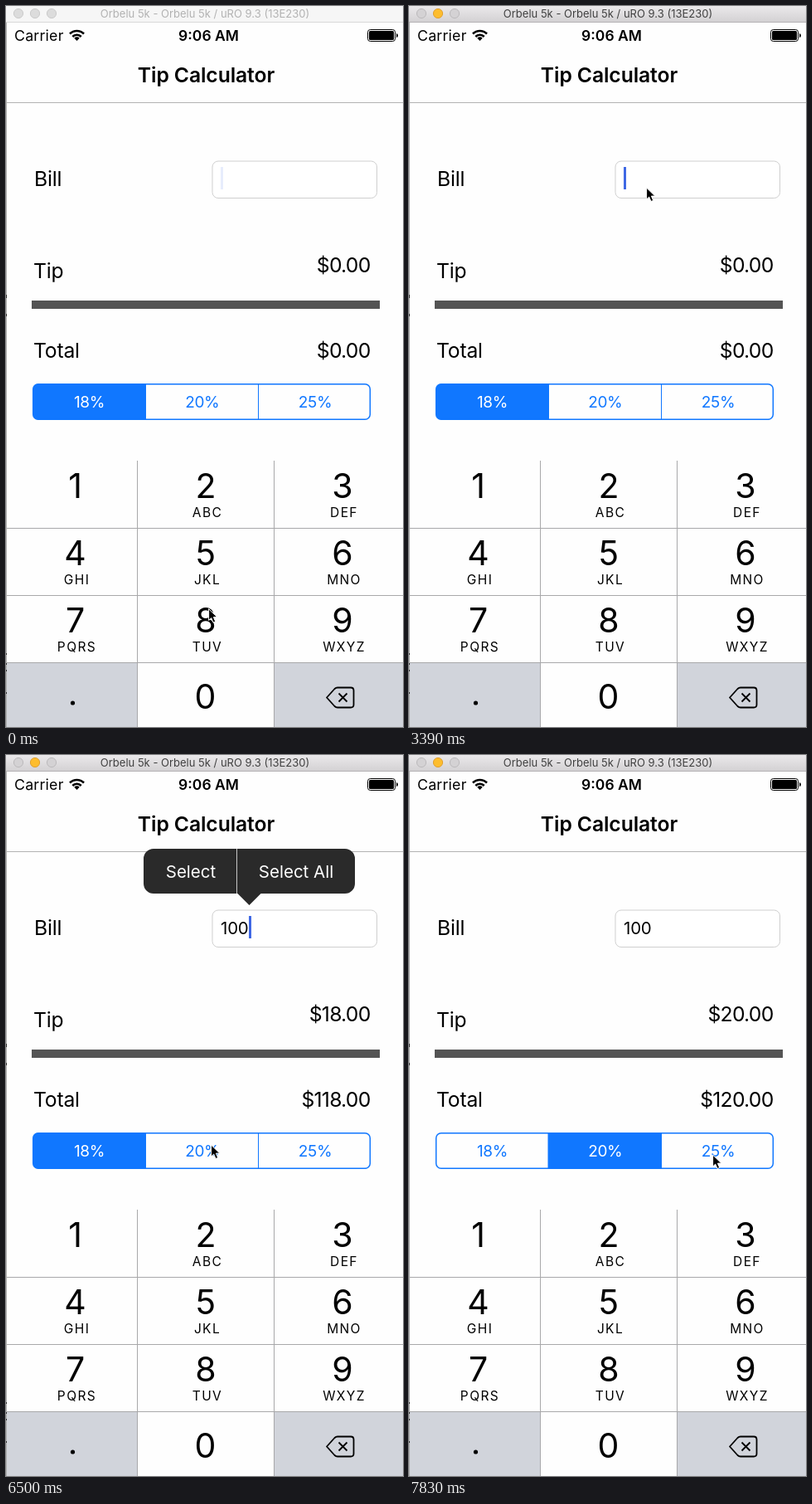
Recreate the animation shown at these times as an HTML page. Size 479x869 px, loop 8000 ms.

```html
<!DOCTYPE html>
<html lang="en">
<head>
<meta charset="utf-8">
<title>Tip Calculator</title>
<style>
html, body { margin: 0; width: 100%; height: 100%; overflow: hidden; background: #fefefe; }
svg { display: block; width: 100%; height: 100%; }
text { font-family: Inter, Roboto, sans-serif; fill: #000; white-space: pre; }
.mid { text-anchor: middle; }
.end { text-anchor: end; }
.label { font-size: 24.7px; letter-spacing: -.2px; }
.money { font-size: 24.7px; letter-spacing: -.75px; }
.seg { font-size: 19px; letter-spacing: -.3px; }
.menu { font-size: 20.5px; fill: #fff; }
.digit { font-size: 41px; }
.abc { font-size: 15.5px; letter-spacing: 1.4px; }
</style>
</head>
<body>
<svg id="stage" viewBox="0 0 479 869" preserveAspectRatio="none">
  <defs>
    <linearGradient id="chrome" x2="0" y2="1">
      <stop stop-color="#ebe9eb"/><stop offset="1" stop-color="#d2d0d2"/>
    </linearGradient>
  </defs>
  <rect width="479" height="869" fill="#fefefe"/>
  <rect id="bar" width="479" height="20"/>
  <path id="barEdge" d="M0 19.5H479"/>
  <g id="lights"></g>
  <text id="title" class="mid" x="240" y="14" font-size="13"></text>

  <path d="M.5 20V869" stroke="#b0b0b0"/>
  <path d="M.5 348v4M.5 371v3M.5 780v2M.5 792v2M.5 800v2M.5 827v2" stroke="#333"/>
  <text x="10" y="42" font-size="17.8" letter-spacing=".2">Carrier</text>
  <g fill="none" stroke="#000" stroke-width="2.6">
    <path d="M77 33.5a12 12 0 0 1 17 0M80.3 37a7.2 7.2 0 0 1 10.4 0"/>
    <path d="M85.5 42l-3.2-3.3a4.5 4.5 0 0 1 6.4 0z" fill="#000" stroke="none"/>
  </g>
  <text class="mid" x="244.500" y="42" font-size="17.500" font-weight="600">9:06 AM</text>
  <rect x="436.500" y="28.500" width="33" height="14" rx="3" fill="none" stroke="#000"/>
  <rect x="438" y="30" width="30" height="11" rx="1.500"/>
  <path d="M471 33q2 .5 2 2.500t-2 2.500z"/>
  <text class="mid" x="241.500" y="91.500" font-size="24.700" font-weight="600" letter-spacing="-.1">Tip Calculator</text>
  <path d="M1 116.500H479" stroke="#b2b2b2"/>

  <text class="label" x="34" y="217">Bill</text>
  <text class="label" x="33" y="328">Tip</text>
  <text class="label" x="33" y="424">Total</text>
  <rect x="249" y="187" width="198.500" height="44.500" rx="7" fill="#fff" stroke="#cfcfcf"/>
  <text id="bill" x="259" y="216" font-size="20.500" letter-spacing="-.2"></text>
  <rect id="caret" y="194" width="3" height="27" fill="#3f68e4"/>
  <text id="tip" class="money end" x="439.500" y="321"></text>
  <rect x="31" y="355" width="420" height="10" fill="#545454"/>
  <text id="total" class="money end" x="439.500" y="424"></text>

  <g id="segments"></g>
  <g id="keys"></g>
  <g id="menu">
    <path d="M178 113H409a12 12 0 0 1 12 12V155a12 12 0 0 1-12 12H307.500L293.500 181 279.500 167H178a12 12 0 0 1-12-12V125a12 12 0 0 1 12-12z" fill="#2a2a2a"/>
    <path d="M278.500 113V167" stroke="#c8c8c8"/>
    <text class="menu mid" x="223" y="148">Select</text>
    <text class="menu mid" x="350" y="148">Select All</text>
  </g>
  <path id="mouse" d="M.6.6V14.500L3.700 11.600 6 17 8.700 15.900 6.400 10.600H10.800z" fill="#000" stroke="#fff"/>
</svg>
<script>
const LOOP = 8000, BLUE = '#1077ff', LINE = '#a8a8aa';
const $ = id => document.getElementById(id);

function add(parent, tag, attrs, text) {
  const el = document.createElementNS('http://www.w3.org/2000/svg', tag);
  for (const k in attrs) el.setAttribute(k, attrs[k]);
  if (text) el.textContent = text;
  $(parent).append(el);
  return el;
}

$('title').textContent = 'Orbelu 5k - Orbelu 5k / uRO 9.3 (13E230)';
const lights = [15, 35, 55].map(cx => add('lights', 'circle', { cx, cy: 9, r: 5.6 }));

// Segmented control
const fills = [
  'M168.500 455.500H39a6.500 6.500 0 0 0-6.500 6.500V492a6.500 6.500 0 0 0 6.500 6.500H168.500z',
  'M167.500 455.500H304.500V498.500H167.500z'
].map(d => add('segments', 'path', { d, fill: BLUE }));
add('segments', 'rect', { x: 32.7, y: 455.7, width: 406.6, height: 42.6, rx: 6, fill: 'none', stroke: BLUE, 'stroke-width': 1.5 });
add('segments', 'path', { d: 'M168.500 456V498M304.500 456V498', stroke: BLUE });
const rates = ['18%', '20%', '25%'].map((s, i) =>
  add('segments', 'text', { class: 'seg mid', x: 100.5 + i * 136.3, y: 484 }, s));

// Number pad
add('keys', 'path', { d: 'M1 792H158V869H1zM324 792H479V869H324z', fill: '#d1d4db' });
add('keys', 'path', { d: 'M158.500 548V869M323.500 548V869M1 629.500H479M1 710.500H479M1 791.500H479', stroke: LINE, fill: 'none' });
const letters = ['', 'ABC', 'DEF', 'GHI', 'JKL', 'MNO', 'PQRS', 'TUV', 'WXYZ'];
letters.forEach((abc, i) => {
  const x = [83.5, 241, 406][i % 3], y = 592.5 + 81 * Math.floor(i / 3);
  add('keys', 'text', { class: 'digit mid', x, y }, String(i + 1));
  add('keys', 'text', { class: 'abc mid', x: x + 2, y: y + 23 }, abc);
});
add('keys', 'text', { class: 'digit mid', x: 240.5, y: 846.5 }, '0');
add('keys', 'circle', { cx: 80.5, cy: 840, r: 2.6 });
add('keys', 'path', {
  d: 'M387 833.500L396.500 823q1.500-1.500 3.500-1.500H416q3.500 0 3.500 3.500V842q0 3.500-3.500 3.500H400q-2 0-3.500-1.500zM401.500 828.500l10 10M411.500 828.500l-10 10',
  fill: 'none', stroke: '#000', 'stroke-width': 1.8, 'stroke-linejoin': 'round'
});

// Held values: [time, value...]
const caretSteps = [[0, .12], [150, 0], [450, .6], [600, 1], [1040, 0], [1490, 1], [2070, 0], [2350, .5],
  [2500, 1], [2950, .4], [3100, 0], [3240, .5], [3390, 1], [5620, .4], [5770, 0], [6060, .5], [6210, 1],
  [6650, .4], [6800, 0], [7100, .4], [7240, 1], [7680, .3], [7830, 0]];
const mouseSteps = [[0, 244, 726], [600, 250, 650], [750, 268, 430], [890, 284, 250], [1040, 286, 218.5],
  [6350, 266, 350], [6500, 247, 469.5], [7100, 262, 472], [7240, 330, 480], [7390, 366, 481.5]];
const menuSteps = [[0, 0], [5330, .5], [5480, 1], [6650, .5], [6800, 0]];
const at = (steps, t) => steps.filter(s => s[0] <= t).pop();
const money = n => '$' + n.toFixed(2);

function draw(t) {
  const active = t >= 2950, bill = t >= 4730 ? 100 : 0, pick = t >= 6650 ? 1 : 0;
  const tip = bill * [.18, .2][pick];

  $('bar').setAttribute('fill', active ? 'url(#chrome)' : '#f6f6f6');
  $('barEdge').setAttribute('stroke', active ? '#b4b2b4' : '#d8d8d8');
  $('title').style.fill = active ? '#404040' : '#b2b2b2';
  lights.forEach((c, i) => {
    const lit = active && i === 1;
    c.setAttribute('fill', lit ? '#fdbd2e' : active ? '#d4d2d4' : '#dcdcdc');
    c.setAttribute('stroke', lit ? '#e0a030' : active ? '#bcbabc' : '#cbcbcb');
  });

  $('bill').textContent = bill || '';
  $('tip').textContent = money(tip);
  $('total').textContent = money(bill + tip);
  fills.forEach((f, i) => f.setAttribute('opacity', i === pick ? 1 : 0));
  rates.forEach((r, i) => { r.style.fill = i === pick ? '#fff' : BLUE; });

  $('caret').setAttribute('x', bill ? 293 : 259);
  $('caret').setAttribute('opacity', at(caretSteps, t)[1]);
  $('menu').setAttribute('opacity', at(menuSteps, t)[1]);
  const [, x, y] = at(mouseSteps, t);
  $('mouse').setAttribute('transform', `translate(${x} ${y})`);
}

let start;
function tick(now) {
  start ??= now;
  draw((now - start) % LOOP);
  requestAnimationFrame(tick);
}
draw(0);
requestAnimationFrame(tick);
</script>
</body>
</html>
```
